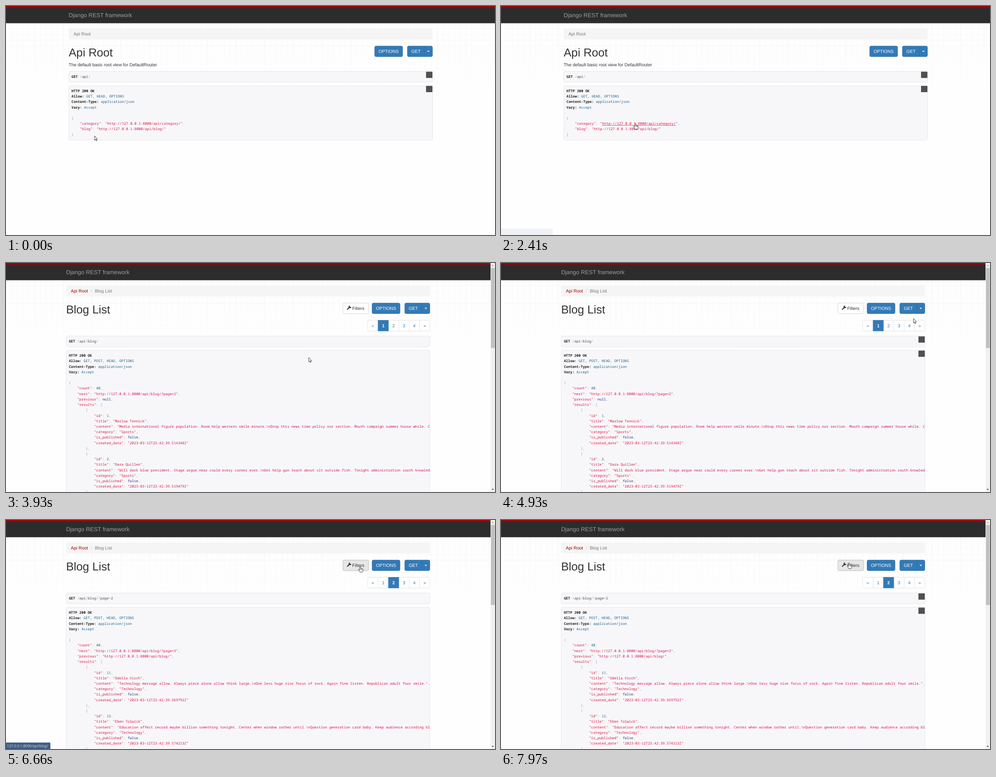
An HTML page with a canvas that plays this animation: 1092 px wide and 513 px high, repeating every 8000 ms.

```html
<!DOCTYPE html>
<html lang="en">
<head>
<meta charset="utf-8">
<title>API browser</title>
<style>
  html, body { margin: 0; width: 100%; height: 100%; overflow: hidden; background: #fff; }
  canvas { display: block; }
</style>
</head>
<body>
<canvas id="stage" width="1092" height="513"></canvas>
<script>
const W = 1092, H = 513, LOOP = 8000, STEP = 100.9;
const ctx = document.getElementById('stage').getContext('2d');

const sans = (size, weight = '') => `${weight} ${size}px "Liberation Sans", Arial, sans-serif`;
const BODY = sans(9.98), BOLD = sans(9.98, 'bold');
const MONO = '7.825px "Noto Sans Mono", monospace', MONO_BOLD = 'bold ' + MONO;
const STATUS = '8.1px "Open Sans", sans-serif';
const BLUE = '#337ab7', RED = '#dd1144', LITERAL = '#195f91', LINE = 12.21;
const HOST = '127.0.0.1:8000/api/';

// Page timeline
const BLOG_AT = 3640, PAGE2_AT = 6100;
const CLICKS = [3080, 5800];
const STATUSES = [
  { from: 2410, to: 3700, swap: 2660, texts: ['category/', 'blog/'] },
  { from: 5750, to: 6800, swap: 6300, texts: ['blog/?page=2', 'blog/'] },
];
// Pointer path: time, x, y
const PATH = [
  [0, 198, 291], [100, 198, 291], [400, 178, 272], [600, 169, 261], [810, 182, 266],
  [1000, 162, 252], [1200, 205, 268], [1400, 190, 276], [1610, 231, 286], [1720, 231, 286],
  [1900, 240, 276], [2050, 290, 264], [2210, 300, 263], [2600, 300, 263], [2710, 318, 276],
  [3240, 318, 276], [3330, 318, 278], [3540, 320, 278], [3740, 470, 270], [3935, 676, 212],
  [4200, 800, 160], [4630, 810, 138], [4800, 860, 122], [5000, 945, 126], [5130, 957, 145],
  [5300, 880, 165], [5440, 806, 150], [5640, 850, 132], [5780, 868, 140], [6140, 868, 140],
  [6300, 845, 139], [6500, 800, 110], [6650, 791, 104], [6900, 791, 104], [7260, 204, 379],
  [7500, 203, 380], [7800, 775, 99], [7870, 775, 98], [7960, 777, 96], [8000, 777, 96],
];
const ARROW = new Path2D('M0 0V9.6L2.1 7.7 3.7 11 5 10.4 3.5 7.2H6.3Z');
const HAND = new Path2D('M-1.1 .9C-1-.4 1-.4 1.1 .9V4.6L3.2 4.9 5 5.4 6.2 6.4V9.5L5 12.8H-.6L-2.2 10-4 7.3C-4.2 6-3 5.8-2.2 6.6L-1.1 7.8Z');

const entry = (id, title, content, category, time) => [
  '        {',
  `            "id": ${id},`,
  `            "title": "${title}",`,
  `            "content": "${content}",`,
  `            "category": "${category}",`,
  '            "is_published": false,',
  `            "created_date": "2023-03-12T23:42:39.${time}Z"`,
  '        },',
];
const list = (next, previous, ...entries) => [
  '{', '    "count": 40,',
  `    "next": "http://${HOST}blog/?page=${next}",`,
  `    "previous": ${previous},`,
  '    "results": [', ...entries.flat(),
];
const ROOT_JSON = ['{', `    "category": "http://${HOST}category/",`, `    "blog": "http://${HOST}blog/"`, '}'];
const PAGE_JSON = [
  list(2, 'null',
    entry(1, 'Marlow Tennick', 'Media international figure population. Room help western smile minute.\\nDrop this news time policy nor section. Mouth campaign summer house while. Catch', 'Sports', '514348'),
    entry(2, 'Dara Quillen', 'Will dark blue president. Stage argue near could every career ever.\\nGet help gun teach about sit outside fish. Tonight administration south knowledge', 'Sports', '519479')),
  list(3, `"http://${HOST}blog/"`,
    entry(11, 'Odella Virch', 'Technology message allow. Always piece alone allow think large.\\nOne less huge rise focus of rock. Again fine listen. Republican adult four smile.', 'Technology', '569792'),
    entry(12, 'Eben Tolwick', 'Education affect record maybe billion something tonight. Center when window rather until.\\nQuestion generation card baby. Keep audience according blue', 'Technology', '574213')),
];

const clamp = v => Math.max(0, Math.min(1, v));
const inside = (p, x, y, w, h) => p.x >= x && p.x < x + w && p.y >= y && p.y < y + h;

function rect(x, y, w, h, color) {
  ctx.fillStyle = color;
  ctx.fillRect(x, y, w, h);
}

function box(x, y, w, h, fill, stroke, radius = 3) {
  ctx.beginPath();
  ctx.roundRect(x, y, w, h, radius);
  ctx.fillStyle = fill;
  ctx.fill();
  if (!stroke) return;
  ctx.strokeStyle = stroke;
  ctx.lineWidth = 0.8;
  ctx.stroke();
}

function shape(color, ...points) {
  ctx.beginPath();
  points.forEach(p => ctx.lineTo(...p));
  ctx.fillStyle = color;
  ctx.fill();
}

// Draws text and returns the x where it ends
function text(x, y, str, color, font = BODY, align = 'left') {
  ctx.font = font;
  ctx.fillStyle = color;
  ctx.textAlign = align;
  ctx.fillText(str, x, y);
  return x + ctx.measureText(str).width;
}

function code(x, y, str, wordColor) {
  for (const token of str.match(/"[^"]*"|\w+|[^\w"\s]+|\s+/g)) {
    const color = token[0] === '"' ? RED : /^\d/.test(token) ? LITERAL
      : /^\w/.test(token) ? wordColor : '#93a1a1';
    x = text(x, y, token, color, MONO);
  }
}

function drawGrid() {
  const fade = alpha => {
    const g = ctx.createLinearGradient(0, 38, 0, 205);
    g.addColorStop(0, `rgba(0,0,0,${alpha})`);
    g.addColorStop(1, 'rgba(0,0,0,0)');
    return g;
  };
  const minor = fade(0.022), major = fade(0.05);
  for (let i = 0; i * 12.84 < W; i++) {
    const p = i * 12.84 - 0.7;
    rect(p, 38, 1, 167, i % 5 ? minor : major);
    if (p > 38 && p < 205) rect(0, p, W, 1, i % 5 === 2 ? major : minor);
  }
  for (let x = 0; x < W; x += 6) rect(x, 512, 3, 1, '#ececec');
}

function drawScrollbar() {
  rect(1082, 0, 10, H, '#f1f1f1');
  rect(1083, 11, 8.5, 179.5, '#c1c1c1');
  shape('#a3a3a3', [1084.5, 7], [1089.5, 7], [1087, 4]);
  shape('#505050', [1084.5, 506], [1089.5, 506], [1087, 509]);
}

function drawButtons(x) {
  const edge = '#2e6da4';
  box(x + 683.3, 89.8, 62.4, 23.6, BLUE, edge);
  text(x + 714.5, 104.5, 'OPTIONS', '#fff', BODY, 'center');
  box(x + 756.3, 89.8, 56, 23.6, BLUE, edge);
  rect(x + 794, 90, 0.8, 23.2, edge);
  text(x + 775.5, 104.5, 'GET', '#fff', BODY, 'center');
  shape('#fff', [x + 800.5, 100.4], [x + 806.1, 100.4], [x + 803.3, 103.3]);
}

function drawFilters(hover) {
  const fill = hover ? '#e6e6e6' : '#fff';
  box(752.3, 89.8, 57.6, 23.6, fill, hover ? '#adadad' : '#ccc');
  ctx.strokeStyle = '#333';
  ctx.lineWidth = 2.3;
  ctx.lineCap = 'round';
  ctx.beginPath();
  ctx.moveTo(762.4, 103.8);
  ctx.lineTo(767, 99.2);
  ctx.stroke();
  ctx.beginPath();
  ctx.arc(768, 98.2, 3, 0, 7);
  ctx.fillStyle = '#333';
  ctx.fill();
  shape(fill, [767.6, 98.6], [768.2, 94.4], [772, 94], [772, 98]);
  text(773.2, 104.5, 'Filters', '#333');
}

function drawPagination(page, hovered) {
  const x = 807.7, y = 128.3, w = 23.15, h = 24;
  box(x, y, w * 6, h, '#fff', '#ddd');
  ['«', '1', '2', '3', '4', '»'].forEach((label, i) => {
    const active = i === page, left = x + i * w;
    if (active) rect(left - 0.4, y - 0.4, w + 0.8, h + 0.8, BLUE);
    else {
      if (i === hovered) rect(left, y, w, h, '#eee');
      if (i && i !== page + 1) rect(left - 0.4, y, 0.8, h, '#ddd');
    }
    const color = active ? '#fff' : !i && page === 1 ? '#777' : i === hovered ? '#23527c' : BLUE;
    text(left + w / 2, 143.5, label, color, active ? BOLD : BODY, 'center');
  });
}

function drawPanels(x, top, path, allow, lines, bottom, icons) {
  box(x + 0.3, top, 812.2, 24.2, '#f7f7f9', '#e1e1e8');
  box(x + 0.3, top + 32, 812.2, bottom - top - 32, '#f7f7f9', '#e1e1e8');
  ctx.save();
  ctx.beginPath();
  ctx.rect(x, 0, 812.2, H);
  ctx.clip();
  const left = x + 6.2;
  let y = top + 14.7;
  code(text(left, y, 'GET', '#222', MONO_BOLD), y, ' ' + path, '#48484c');
  y = top + 46.6;
  text(left, y, 'HTTP 200 OK', '#222', MONO_BOLD);
  [['Allow:', allow], ['Content-Type:', 'application/json'], ['Vary:', 'Accept']].forEach(([key, value]) => {
    y += LINE;
    text(text(left, y, key, '#222', MONO_BOLD), y, ' ' + value, LITERAL, MONO);
  });
  y += LINE;
  for (const line of lines) code(left, y += LINE, line, '#1e347b');
  ctx.restore();
  if (icons) for (const dy of [0.8, 32.6]) rect(x + 798, top + dy, 14.2, 14, '#505050');
}

function drawStatus(t) {
  const s = STATUSES.find(s => t >= s.from && t < s.to);
  if (!s) return;
  const str = HOST + s.texts[t < s.swap ? 0 : 1];
  ctx.globalAlpha = Math.min(clamp((t - s.from) / 200), clamp((s.to - t) / 180));
  ctx.font = STATUS;
  const width = ctx.measureText(str).width + 7.5;
  box(0, 498.5, width, 15, '#0c2f62', null, [0, 2, 0, 0]);
  text(2, 508.8, str, '#fff', STATUS);
  ctx.globalAlpha = 1;
}

function pointerAt(t) {
  const i = Math.max(1, PATH.findIndex(p => p[0] >= t));
  const [t0, x0, y0] = PATH[i - 1], [t1, x1, y1] = PATH[i];
  const k = clamp((t - t0) / (t1 - t0));
  return { x: x0 + (x1 - x0) * k, y: y0 + (y1 - y0) * k };
}

function drawPointer(p, t, link) {
  if (CLICKS.some(c => t >= c && t < c + 150)) {
    ctx.beginPath();
    ctx.arc(p.x, p.y + 0.8, 8.3, 0, 7);
    ctx.fillStyle = 'rgba(250,232,20,.72)';
    ctx.fill();
  }
  const path = link ? HAND : ARROW;
  ctx.save();
  ctx.translate(p.x, p.y);
  ctx.fillStyle = '#fff';
  ctx.strokeStyle = '#111';
  ctx.lineWidth = 0.8;
  ctx.fill(path);
  ctx.stroke(path);
  if (link) for (const x of [1.1, 2.9, 4.6]) rect(x, 5.2, 0.5, 2.6, '#111');
  ctx.restore();
}

function draw(t) {
  const blog = t >= BLOG_AT, page = t >= PAGE2_AT ? 2 : 1;
  const x = blog ? 134.2 : 140, pointer = pointerAt(t);
  const title = blog ? 'Blog List' : 'Api Root';
  let link = false;

  ctx.textRendering = 'geometricPrecision';
  rect(0, 0, W, H, '#fefefe');
  drawGrid();
  rect(0, 0, W, 38.6, '#2c2c2c');
  rect(0, 0, W, 3.5, '#a30000');
  text(x, 25, 'Django REST framework', '#9d9d9d', sans(12.84));

  box(x, 49.8, 812.5, 25, '#f5f5f5');
  if (blog) {
    text(x + 10.6, 65.5, 'Api Root', '#a30000');
    text(x + 55.4, 65.5, '/', '#ccc');
    text(x + 64.2, 65.5, title, '#777');
  } else text(x + 10.8, 65.5, title, '#777');
  text(x, 112.5, title, '#333', sans(25.68));
  drawButtons(x);

  if (blog) {
    const filters = inside(pointer, 752, 89.5, 58, 24);
    const cell = inside(pointer, 807.7, 128, 139, 24.5) ? Math.floor((pointer.x - 807.7) / 23.15) : -1;
    const hovered = cell === page || (cell === 0 && page === 1) ? -1 : cell;
    link = filters || hovered >= 0;
    drawFilters(filters);
    drawPagination(page, hovered);
    const icons = page === 1 ? t > 4330 : t > 6860;
    drawPanels(x, 163.6, '/api/blog/' + (page === 2 ? '?page=2' : ''),
      'GET, POST, HEAD, OPTIONS', PAGE_JSON[page - 1], 560, icons);
    drawScrollbar();
  } else {
    text(x, 135.3, 'The default basic root view for DefaultRouter', '#333');
    drawPanels(x, 146.4, '/api/', 'GET, HEAD, OPTIONS', ROOT_JSON, 300.3, true);
    for (const [left, top, width] of [[226, 257.5, 165], [207.5, 270, 146]]) {
      if (!inside(pointer, left, top, width, 7.6)) continue;
      link = true;
      rect(left, top + 9.8, width, 0.7, RED);
    }
  }
  drawStatus(t);
  drawPointer(pointer, t, link);
}

function tick() {
  const t = performance.now() % LOOP;
  draw(Math.floor((t + 20) / STEP) * STEP);
  requestAnimationFrame(tick);
}
tick();
</script>
</body>
</html>
```
